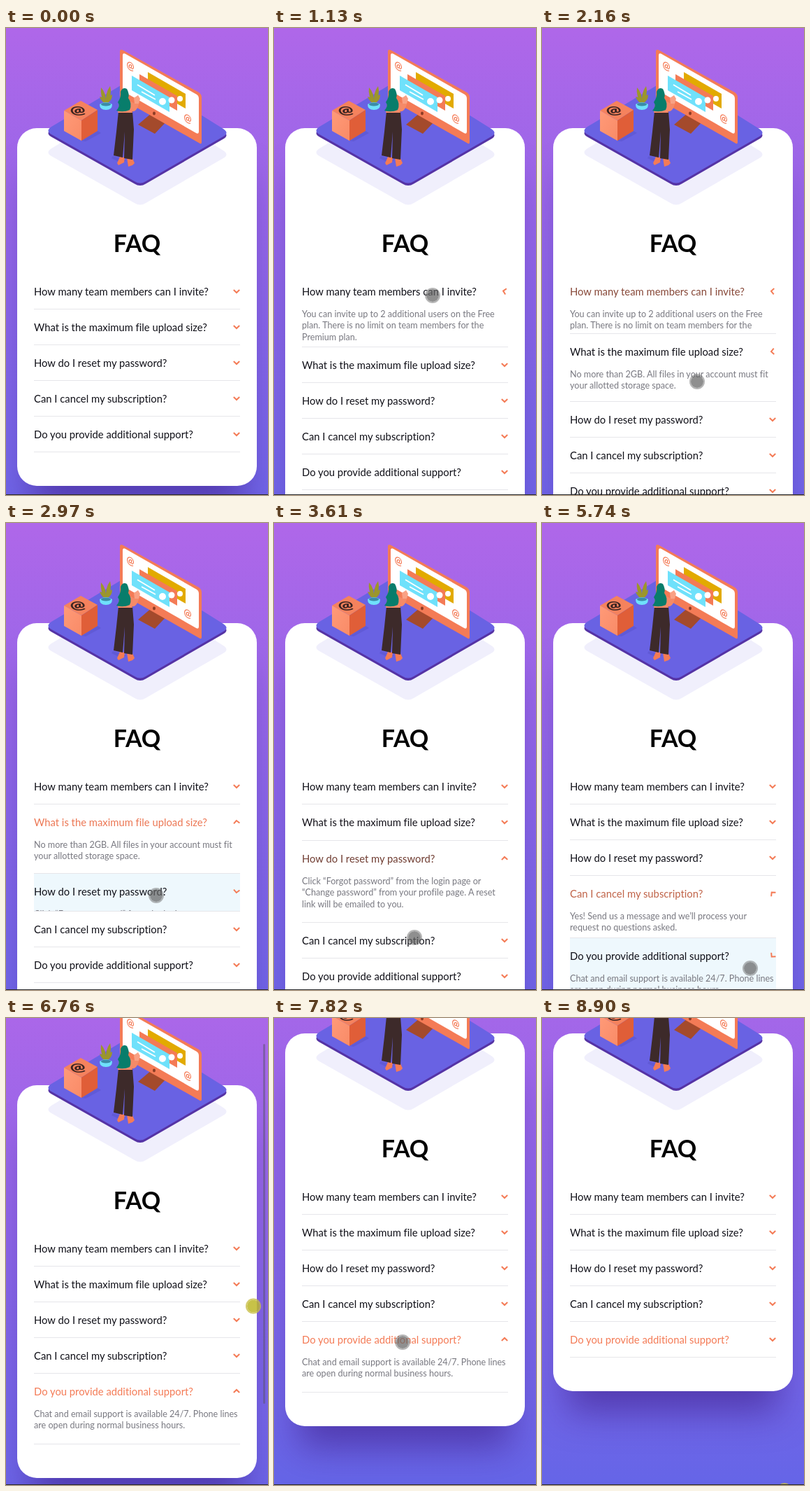
An HTML page that plays this animation: 375x667 px, repeating every 9000 ms.

```html
<!DOCTYPE html>
<html lang="en">
<head>
<meta charset="utf-8">
<title>FAQ accordion</title>
<style>
  html, body { margin: 0; width: 100%; height: 100%; overflow: hidden; background: #6565e7; }
  #stage { position: relative; width: 375px; height: 667px; overflow: hidden; font-family: Lato, sans-serif; font-variant-ligatures: none; }
  #page { position: absolute; inset: 0 0 auto; height: 788px; background: linear-gradient(#af67e9, #6565e7); }
  #card { position: absolute; left: 16px; top: 143px; width: 343px; border-radius: 28px; background: #fff;
          box-shadow: 0 50px 50px -20px rgba(53, 18, 122, .5); }
  #art { position: absolute; left: 0; top: 0; }
  h1 { position: absolute; top: 144px; width: 100%; margin: 0; text-align: center; font: 700 34px/40px Lato, sans-serif; color: #000; }
  #list { position: absolute; left: 24px; top: 208px; width: 295px; }
  .item { position: relative; box-sizing: border-box; overflow: hidden; border-bottom: 1px solid #e6e6ea; }
  .question { position: absolute; top: 15px; font-size: 14.8px; line-height: 20px; white-space: nowrap; }
  .answer { position: absolute; top: 49.5px; font-size: 12.6px; line-height: 16.7px; color: #787880; white-space: pre; }
  .chevron { position: absolute; left: 284px; top: 19px; width: 12px; height: 12px; }
  #cursor { position: absolute; left: -11px; top: -11px; width: 18px; height: 18px; border: 2px solid; border-radius: 50%; background-clip: padding-box; }
  #thumb { position: absolute; right: 4px; width: 3px; height: 514px; border-radius: 2px; background: rgba(90, 85, 110, .5); }
  #edge { position: absolute; left: 0; top: 666px; width: 375px; height: 1px; background: #292a2d; }
</style>
</head>
<body>
<div id="stage">
  <div id="page">
    <div id="card"><h1>FAQ</h1><div id="list"></div></div>
    <svg id="art" width="375" height="270">
      <defs>
        <path id="floor" d="M65 140L176 74Q188 67 200 74L311 143Q320 149 311 154L200 218Q192 223 184 218L65 151Q56 146 65 140Z"/>
        <path id="note" d="M0 0L54 31V52L0 21Z"/>
        <linearGradient id="side" x2="1" y2="1"><stop stop-color="#ff9a78"/><stop offset="1" stop-color="#f98b67"/></linearGradient>
      </defs>
      <use href="#floor" y="32" fill="#f0effc"/>
      <use href="#floor" y="4.5" fill="#5533a5"/>
      <use href="#floor" y="1" fill="#6962e3"/>
      <!-- monitor -->
      <path d="M189 138L209 121L232 131L213 151Z" fill="#a44a2c"/>
      <path d="M163 34Q163 29 168 32L276 92Q280 95 280 99V163Q280 167 276 164L163 100Z" fill="#f47b56"/>
      <path d="M167 39Q167 35 171 37L273 95Q276 97 276 101V148Q276 152 272 150L167 90Z" fill="#fff"/>
      <ellipse cx="212" cy="122" rx="2" ry="2.4" fill="#8d3c25"/>
      <use href="#note" x="203" y="63" fill="#e2aa00"/>
      <use href="#note" x="191" y="66" fill="#f47b56"/>
      <use href="#note" x="180" y="68" fill="#6fe1fb"/>
      <g fill="#fff"><circle cx="224" cy="105" r="5"/><circle cx="237" cy="103" r="4.5"/><circle cx="249" cy="101" r="4"/></g>
      <path d="M188 81L213 96M194 91L214 102" stroke="#fff" stroke-width="1.8"/>
      <g fill="#f47b56" font-family="Lato, sans-serif" font-size="15" font-weight="700" text-anchor="middle">
        <text transform="matrix(.87 .4 0 1 178 59)">@</text>
        <text transform="matrix(.87 .4 0 1 260 134)">@</text>
      </g>
      <!-- box -->
      <path d="M108 161L131 147L136 150L114 162Z" fill="#605ad6"/>
      <path d="M83 118L107 104L131 117L108 132Z" fill="#f5825d"/>
      <path d="M83 118L108 132V161L83 147Z" fill="url(#side)"/>
      <path d="M131 117L108 132V161L131 147Z" fill="#e05e38"/>
      <text transform="matrix(1.05 -.12 .3 .65 105 123)" font-family="Lato, sans-serif" font-size="24" font-weight="900" text-anchor="middle" fill="#3a2422">@</text>
      <!-- plant -->
      <path d="M143 108Q134 98 136 85Q144 93 143 108Q142 92 149 83Q153 96 143 108Q146 97 152 95Q152 105 143 108Q137 106 134 98Q141 99 143 108" fill="#9c962b"/>
      <path d="M134 109Q143 103 152 109Q152 117 143 117Q134 117 134 109Z" fill="#6fe1fb"/>
      <ellipse cx="143" cy="109" rx="7" ry="2.5" fill="#3c8ba8"/>
      <!-- woman -->
      <path d="M153 183L172 189L166 193L151 186Z" fill="#605ad6"/>
      <path d="M176 118Q186 123 190 109L189 99L185 99L185 108L176 104Z" fill="#f58a68"/>
      <path d="M183 100L189 96L192 101L190 108L184 108Z" fill="#f9a184"/>
      <path d="M163 184L170 185L169 192L161 196L159 193ZM173 185L181 186L184 193L181 196L175 198Z" fill="#f47b56"/>
      <path d="M161 119L181 119L183 145L181 188L169 186L170 148L167 185L154 182L158 148Z" fill="#3d2a2a"/>
      <path d="M163 101Q171 96 178 104L181 121L160 121Z" fill="#f58a68"/>
      <path d="M164 91Q167 84 173 87Q177 94 175 100Q181 108 177 117Q168 121 158 118Q164 111 160 106Q165 99 164 91Z" fill="#087d6b"/>
    </svg>
  </div>
  <div id="thumb"></div>
  <div id="cursor"></div>
  <div id="edge"></div>
</div>
<script>
const LOOP = 9000, DURATION = 800;
const faqs = [
  { q: 'How many team members can I invite?', open: 870, close: 1935,
    a: 'You can invite up to 2 additional users on the Free\nplan. There is no limit on team members for the\nPremium plan.' },
  { q: 'What is the maximum file upload size?', open: 1935, close: 2930,
    a: 'No more than 2GB. All files in your account must fit\nyour allotted storage space.' },
  { q: 'How do I reset my password?', open: 2930, close: 4270,
    a: 'Click “Forgot password” from the login page or\n“Change password” from your profile page. A reset\nlink will be emailed to you.' },
  { q: 'Can I cancel my subscription?', open: 4270, close: 5605,
    a: 'Yes! Send us a message and we’ll process your\nrequest no questions asked.' },
  { q: 'Do you provide additional support?', open: 5605, close: 7930, staysLit: true,
    a: 'Chat and email support is available 24/7. Phone lines\nare open during normal business hours.' }
];
// Keys: time, then values
const scrollKeys = [[6605, 0], [6970, 121]];
const cursorKeys = [
  [200, 356, 680], [550, 227, 382], [1150, 227, 382], [1750, 222, 505], [2300, 222, 505], [2620, 215, 532],
  [3150, 215, 532], [3600, 201, 592], [3900, 213, 597], [4600, 213, 597], [5320, 303, 635], [5480, 303, 635],
  [5600, 298, 636], [5850, 298, 636], [6380, 354, 459], [6605, 354, 459], [6970, 354, 338], [7180, 354, 338],
  [7700, 184, 463], [8060, 184, 463], [8500, 347, 685], [8899, 347, 685], [8900, 347, 675]
];

const $ = id => document.getElementById(id);
const clamp = v => Math.min(1, Math.max(0, v));
const smooth = v => v * v * (3 - 2 * v);
const mix = (a, b, k) => a + (b - a) * k;

// CSS "ease": cubic-bezier(.25, .1, .25, 1)
function ease(x) {
  x = clamp(x);
  let lo = 0, hi = 1, s;
  for (let i = 0; i < 20; i++) {
    s = (lo + hi) / 2;
    const bx = .75 * s * (1 - s) + s ** 3;
    if (bx < x) lo = s; else hi = s;
  }
  return .3 * s * (1 - s) ** 2 + 3 * s * s * (1 - s) + s ** 3;
}

function track(keys, t) {
  const next = keys.findIndex(k => k[0] > t);
  if (next === 0) return keys[0].slice(1);
  if (next < 0) return keys.at(-1).slice(1);
  const from = keys[next - 1], to = keys[next];
  const k = smooth((t - from[0]) / (to[0] - from[0]));
  return from.slice(1).map((v, i) => mix(v, to[i + 1], k));
}

for (const f of faqs) {
  f.row = document.createElement('div');
  f.row.className = 'item';
  f.row.innerHTML = `<div class="question">${f.q}</div><div class="answer">${f.a}</div>
    <svg class="chevron" viewBox="-6 -6 12 12"><path d="M-4.2 -2L0 2L4.2 -2" fill="none" stroke="#f47b56" stroke-width="2"/></svg>`;
  $('list').append(f.row);
  [f.question, , f.chevron] = f.row.children;
  f.full = f.a.split('\n').length * 16.6 + 16.4;
}

function drawItem(f, t) {
  const closing = t >= f.close;
  const p = ease((t - (closing ? f.close : f.open)) / DURATION);
  const extra = Math.round(closing ? f.full * (1 - p) : Math.min(f.full, 96 * p));
  const lit = closing ? (f.staysLit ? 1 : 1 - p) : clamp((t - f.open - 450) / 550);
  const tap = t < f.open - 70 ? 0 : 1 - clamp((t - f.open - 140) / 60);
  f.row.style.height = 51 + extra + 'px';
  f.row.style.backgroundColor = `rgba(238, 248, 253, ${tap})`;
  f.question.style.color = `rgb(${mix(16, 244, lit)}, ${mix(16, 123, lit)}, ${mix(24, 86, lit)})`;
  f.chevron.style.transform = `rotate(${180 * (closing ? 1 - p : p)}deg)`;
  return extra;
}

function draw(t) {
  const grown = faqs.reduce((sum, f) => sum + drawItem(f, t), 0);
  $('card').style.height = 511 + grown + 'px';

  const [scroll] = track(scrollKeys, t);
  $('page').style.transform = `translateY(${-Math.round(scroll)}px)`;
  $('thumb').style.top = scroll * 514 / 667 + 'px';
  $('thumb').style.opacity = t < 6605 ? 0 : 1 - clamp((t - 7200) / 300);

  const [x, y] = track(cursorKeys, t);
  const yellow = t >= 8900 || (t >= 6500 && t < 6980);
  const cursor = $('cursor').style;
  cursor.transform = `translate(${x}px, ${y}px)`;
  cursor.backgroundColor = yellow ? 'rgba(190, 184, 40, .85)' : 'rgba(100, 100, 100, .72)';
  cursor.borderColor = yellow ? 'rgba(200, 190, 70, .8)' : 'rgba(110, 110, 110, .5)';
}

const start = performance.now();
function tick() {
  draw((performance.now() - start) % LOOP);
  requestAnimationFrame(tick);
}
tick();
</script>
</body>
</html>
```
